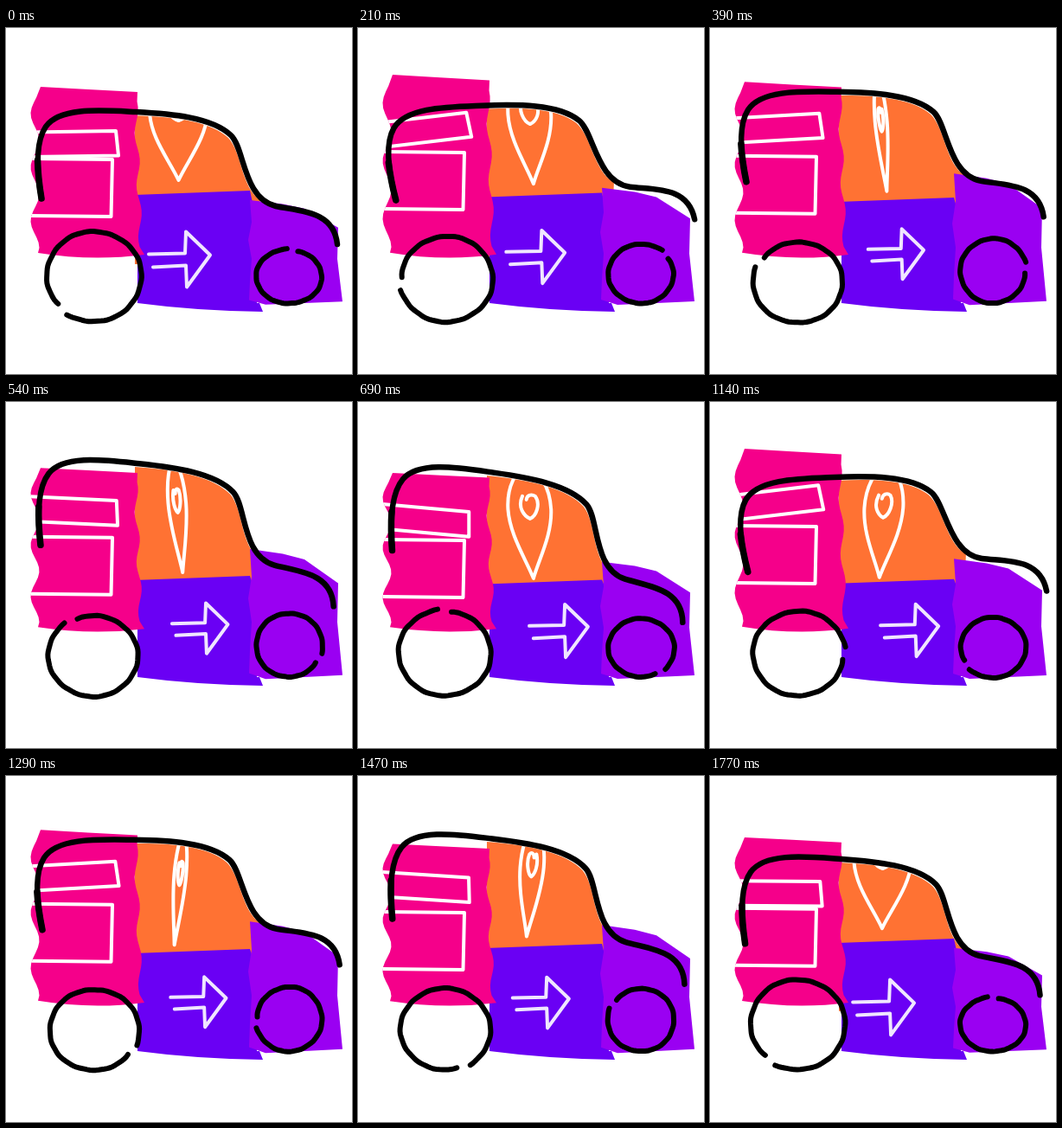
Write an HTML page with a canvas that moves like this. It is 400 px wide and 400 px high and loops after 1800 ms.

```html
<!DOCTYPE html>
<html lang="en">
<head>
<meta charset="utf-8">
<title>Delivery car</title>
<style>
html, body { margin: 0; width: 100%; height: 100%; overflow: hidden; background: #fff }
canvas { display: block }
</style>
</head>
<body>
<canvas id="stage" width="400" height="400"></canvas>
<script>
const ctx = document.getElementById('stage').getContext('2d');
const LOOP = 1800, STEP = 30, TAU = Math.PI * 2;
const PINK = '#f5008a', ORANGE = '#ff7233', BLUE = '#6a00f4', PURPLE = '#9a00f2';
const WHITE = '#fff', PALE = '#f0e6ff';

// Shapes at rest; motion is applied as a matrix so that line widths stay even
const ROOF = new Path2D('M41 184C36 155 33 120 46 101C62 78 110 82 150 84S238 90 260 111C276 126 274 184 312 193C340 199 379 198 383 237');
const PILLAR = new Path2D('M41 184Q37 160 36.5 140');
const GLASS = new Path2D('M135 88C190 88 236 94 257 114C273 131 272 172 294 186L284 260H135Z');
const HOOD = new Path2D('M282 183L320 188L345 194L384 219L383 260L389 316L345 318L300 320L281 314L282 290L284 260L280 235L284 212Z');
const LID = new Path2D('M20 113L127 111.5L130 140L20 141.5');
const BOX = new Path2D('M20 151L123 152L121.5 218L20 217');
const ARROW = new Path2D('M-71-1L-29-2L-28-27L0 0L-27 37L-28 12L-66 14');
const PIN = new Path2D('M0 0C-10-22-33-50-33.5-80C-33.5-105-18-127 0-127C18-127 33.5-105 33.5-80C33-50 10-22 0 0Z' +
  'M-10-95C-19-82-9-72 0-69C10-72 18-86 10-95C4-98-3-96-4-91');

function place(path, matrix) {
  const p = new Path2D();
  p.addPath(path, matrix);
  return p;
}

const shift = (x, y) => new DOMMatrix().translate(x, y);

// Tilt (radians) around a pivot, then a vertical offset
const rock = (x, y, tilt, dy) => shift(x, y + dy).rotate(tilt * 360 / TAU).translate(-x, -y);

// Vertical stretch that keeps the given base line in place
const stretch = (base, k) => new DOMMatrix([1, 0, 0, k, 0, base * (1 - k)]);

function fill(path, color) {
  ctx.fillStyle = color;
  ctx.fill(path);
}

function line(path, width, color = '#000') {
  ctx.lineWidth = width;
  ctx.strokeStyle = color;
  ctx.stroke(path);
}

function clipped(area, paint) {
  ctx.save();
  ctx.clip(area);
  paint();
  ctx.restore();
}

// Sheet with wavy torn sides
function tornSheet() {
  const p = new Path2D('M40 68L95 71L152 74');
  for (let y = 85; y < 255; y += 6)
    p.lineTo(149.5 + .035 * (y - 74) - 2.5 * Math.cos((y - 123) * TAU / 60), y);
  p.lineTo(160, 262);
  p.quadraticCurveTo(100, 270, 37, 260);
  for (let y = 254; y > 70; y -= 6)
    p.lineTo(33.5 + 5 * Math.cos((y - 68) * TAU / 62), y);
  p.closePath();
  return p;
}
const SHEET = tornSheet();

// Open hand-drawn ring; its gap sits at the given angle
function ring(cx, cy, rx, ry, angle, gap) {
  const p = new Path2D();
  for (let u = 0; u <= 1; u += 1 / 90) {
    const a = angle + gap + u * (TAU - 2 * gap);
    const r = 1 + .03 * (2 * u - 1) ** 3 + .006 * Math.sin(u * 25) + .005 * Math.sin(u * 90);
    p.lineTo(cx + rx * r * Math.cos(a), cy + ry * r * Math.sin(a));
  }
  return p;
}

function draw(t) {
  // One slow turn per loop; the body bounces twice as fast
  const turn = t / LOOP * TAU, slowC = Math.cos(turn), slowS = Math.sin(turn);
  const c = Math.cos(2 * turn), s = Math.sin(2 * turn);
  const body = rock(195, 160, -.09 * s, 13 * c);
  const split = 203 - 10 * slowC;
  ctx.clearRect(0, 0, 400, 400);
  ctx.lineCap = ctx.lineJoin = 'round';

  // Window with the spinning map pin
  clipped(new Path2D('M149 0H400V400H149Z'), () => {
    const glass = place(GLASS, body);
    fill(glass, ORANGE);
    clipped(glass, () => line(place(PIN,
      new DOMMatrix([-slowC, 0, .085 * slowS, 1, 199.5 + 5 * slowS, 192 - 16 * slowC])), 4, WHITE));
  });

  // Door with the arrow
  fill(new Path2D(`M148 ${split}L282 ${split - 5}L290 225V318H293L297 328Q220 327 152 318V260Z`), BLUE);
  const tipX = 252.3 - 18 * slowC + 1.7 * c;
  line(place(ARROW, shift(tipX, 259.5 + 3 * c).scale(.95 + .05 * c)), 4, PALE);

  fill(place(HOOD, stretch(318, 1 - .119 * c)), PURPLE);

  // Cargo area with the parcel
  const cargo = place(SHEET, stretch(265, 1 + .071 * s));
  fill(cargo, PINK);
  clipped(cargo, () => {
    line(place(LID, rock(82, 126, -.105 * s, 7.5 * c - 10 * s)), 4, WHITE);
    line(place(BOX, shift(0, -8 * s)), 4, WHITE);
  });

  line(ring(101.5 + s, 290.5 - 3.6 * c, 53.2 + 2 * c, 49.2 + 2.5 * c, turn + 2.3, .15), 6);
  line(ring(327.3, 284 + 3.3 * c, 38, 34.4 - 3.2 * c, turn + 4.82, .17), 6);

  line(place(ROOF, body), 6.5);
  line(place(PILLAR, body), 7.5);
}

function frame(now) {
  draw(Math.floor(now % LOOP / STEP) * STEP);
  requestAnimationFrame(frame);
}
draw(0);
requestAnimationFrame(frame);
</script>
</body>
</html>
```
